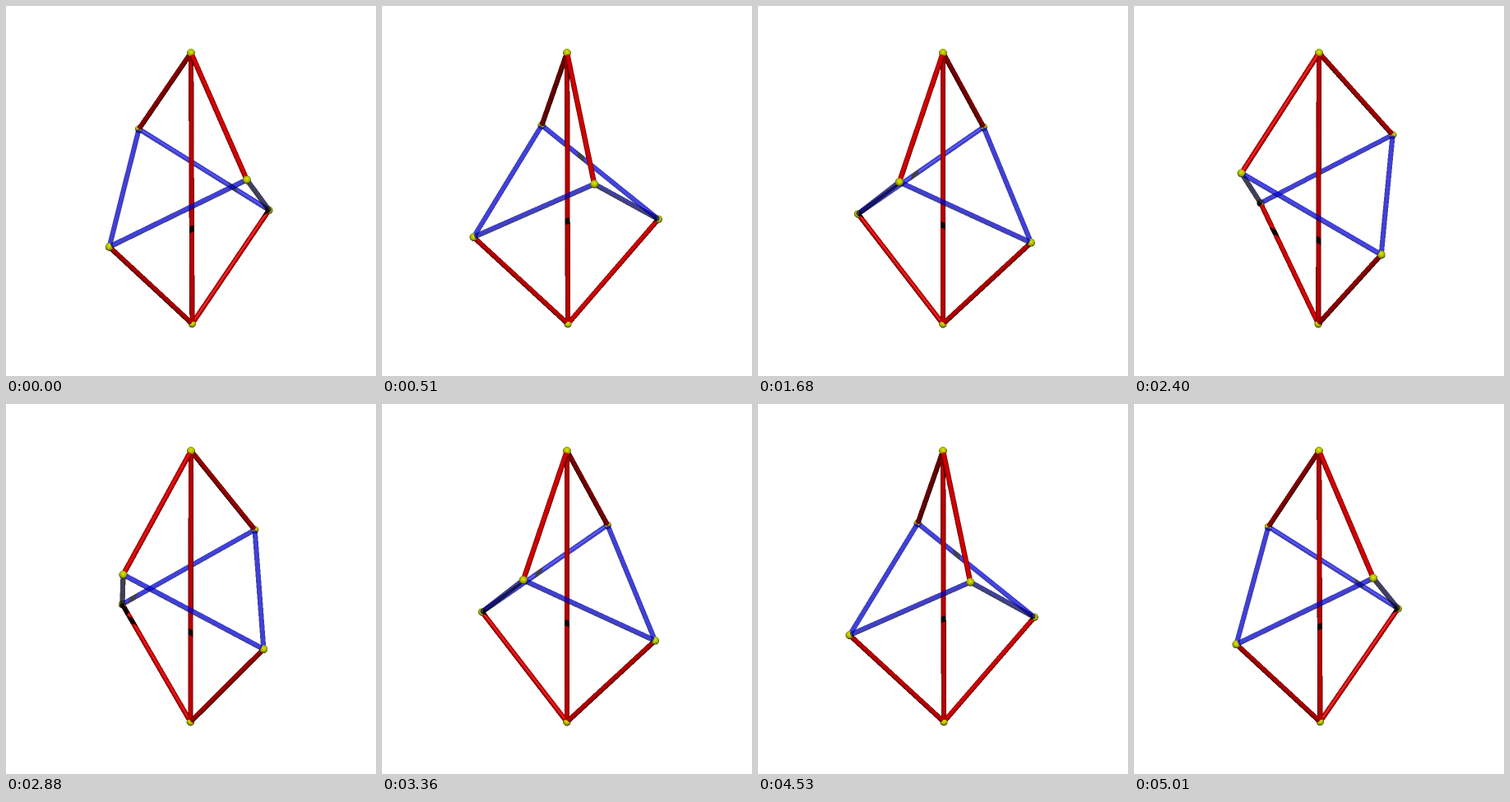
Recreate the animation shown at these times as an HTML page with a canvas. Size 450 px wide and 450 px high, loop 5.04 s.

```html
<!DOCTYPE html>
<html lang="en">
<head>
<meta charset="utf-8">
<title>Swinging bar framework</title>
<style>
  html, body { margin: 0; width: 100%; height: 100%; overflow: hidden; background: #fff; }
  canvas { display: block; width: 450px; height: 450px; }
</style>
</head>
<body>
<canvas id="stage" width="450" height="450"></canvas>
<script>
const SIZE = 450, MID = 225;
const STEP_MS = 30, STEPS = 168;
const RAD = Math.PI / 180;

// Camera looks down by TILT from distance DIST; the light sits above it.
const TILT = 19.24 * RAD, DIST = 2700;
const LIGHT = [0, -Math.sin(15.8 * RAD), Math.cos(15.8 * RAD)];
const HALF = [0, -Math.sin(7.9 * RAD), Math.cos(7.9 * RAD)];
const AMBIENT = 0.1;

const ARM = 117.4, ARM_Z = 48, POLE_Z = 174.2;
const ROD_R = 3.1, BALL_R = 4.8;
const RED = { rgb: [212, 0, 0], alpha: 1, gloss: 110 };
const BLUE = { rgb: [0, 0, 222], alpha: 0.75, gloss: 110 };
const YELLOW = { rgb: [205, 215, 0], alpha: 1, gloss: 40 };

// Body coordinates: side, front, height.
const NODES = [
  [0, 0, POLE_Z], [0.65, 1.6, -POLE_Z],
  [0, ARM, ARM_Z], [0, -ARM, ARM_Z],
  [ARM, 0, -ARM_Z], [-ARM, 0, -ARM_Z]
];
const BARS = [
  [0, 1, RED], [0, 2, RED], [0, 3, RED], [1, 4, RED], [1, 5, RED],
  [2, 4, BLUE], [2, 5, BLUE], [3, 4, BLUE], [3, 5, BLUE]
];

const ctx = document.getElementById('stage').getContext('2d');
const image = ctx.createImageData(SIZE, SIZE);
const dot = (a, b) => a[0] * b[0] + a[1] * b[1] + a[2] * b[2];

// Screen x, screen y, depth towards the viewer, scale.
function project([side, front, height], angle) {
  const c = Math.cos(angle), s = Math.sin(angle);
  const x = side * c + front * s;
  const f = front * c - side * s;
  const depth = f * Math.cos(TILT) + height * Math.sin(TILT);
  const up = height * Math.cos(TILT) - f * Math.sin(TILT);
  const k = 1 / (1 - depth / DIST);
  return [MID + x * k, MID - up * k, depth, k];
}

function makeRod(a, b, paint) {
  const d = [b[0] - a[0], b[1] - a[1], b[2] - a[2]];
  const len = Math.hypot(...d);
  const u = d.map(v => v / len);
  const m = Math.hypot(u[0], u[1]);
  const r = ROD_R * (a[3] + b[3]) / 2;
  const side = [u[1] / m, -u[0] / m];
  const face = [-u[2] * u[0] / m, -u[2] * u[1] / m, m];
  const lu = dot(LIGHT, u);
  const rod = { paint };

  rod.near = (x, y) => {
    const dx = x - a[0], dy = y - a[1];
    if (Math.abs(dx * side[0] + dy * side[1]) > r + 1) return false;
    const along = (dx * u[0] + dy * u[1]) / m;
    return along > -r - 1 && along < len * m + r + 1;
  };

  rod.hit = (x, y) => {
    const dx = x - a[0], dy = y - a[1];
    const e = dx * side[0] + dy * side[1];
    if (Math.abs(e) >= r) return null;
    const h = Math.sqrt(r * r - e * e);
    const t = ((dx * u[0] + dy * u[1]) / m + h * u[2]) / m;
    if (t < 0 || t > len) return null;
    const normal = [
      (e * side[0] + h * face[0]) / r,
      (e * side[1] + h * face[1]) / r,
      h * face[2] / r
    ];
    return { part: rod, point: [x, y, a[2] + t * u[2] + h * m], normal };
  };

  // Does this rod lie between the point and the light?
  rod.blocks = p => {
    const q = [p[0] - a[0], p[1] - a[1], p[2] - a[2]];
    const qu = dot(q, u), ql = dot(q, LIGHT);
    const s = (lu * qu - ql) / (1 - lu * lu);
    const t = qu + s * lu;
    if (s <= 0 || t < 0 || t > len) return false;
    return dot(q, q) + s * s + t * t + 2 * (s * ql - t * qu - s * t * lu) < r * r;
  };
  return rod;
}

function makeBall(c) {
  const r = BALL_R * c[3];
  const ball = { paint: YELLOW };
  ball.near = (x, y) => Math.hypot(x - c[0], y - c[1]) < r + 1;
  ball.hit = (x, y) => {
    const dx = x - c[0], dy = y - c[1];
    const hh = r * r - dx * dx - dy * dy;
    if (hh <= 0) return null;
    const h = Math.sqrt(hh);
    return { part: ball, point: [x, y, c[2] + h], normal: [dx / r, dy / r, h / r] };
  };
  return ball;
}

function shade({ part, point, normal }, rods) {
  const { rgb, gloss } = part.paint;
  const facing = dot(normal, LIGHT);
  const dark = facing <= 0 || rods.some(rod => rod !== part && rod.blocks(point));
  if (dark) return rgb.map(v => v * AMBIENT);
  const level = Math.max(AMBIENT, Math.pow(facing, 0.6));
  const shine = gloss * Math.pow(Math.max(0, dot(normal, HALF)), 150);
  return rgb.map(v => Math.min(255, v * level + shine));
}

function addSample(x, y, parts, rods, sum) {
  const hits = [];
  for (const part of parts) {
    const hit = part.hit(x, y);
    if (hit) hits.push(hit);
  }
  hits.sort((p, q) => q.point[2] - p.point[2]);
  let left = 1;
  for (const hit of hits) {
    const color = shade(hit, rods);
    const alpha = hit.part.paint.alpha;
    for (let i = 0; i < 3; i++) sum[i] += color[i] * alpha * left;
    left *= 1 - alpha;
    if (left === 0) break;
  }
  for (let i = 0; i < 3; i++) sum[i] += 255 * left;
}

function draw(step) {
  const turn = Math.min(step, STEPS - step);
  const angle = (33.7 - 1.06 * turn) * RAD;
  const pts = NODES.map(n => project(n, angle));
  const rods = BARS.map(([i, j, paint]) => makeRod(pts[i], pts[j], paint));
  const parts = rods.concat(pts.map(makeBall));
  image.data.fill(255);
  for (let y = 50; y < 394; y++) {
    for (let x = 100; x < 350; x++) {
      const close = parts.filter(p => p.near(x + 0.5, y + 0.5));
      if (!close.length) continue;
      const sum = [0, 0, 0];
      for (const oy of [0.25, 0.75]) {
        for (const ox of [0.25, 0.75]) addSample(x + ox, y + oy, close, rods, sum);
      }
      const at = (y * SIZE + x) * 4;
      for (let i = 0; i < 3; i++) image.data[at + i] = sum[i] / 4;
    }
  }
  ctx.putImageData(image, 0, 0);
}

const start = performance.now();
let shown = -1;
function tick() {
  const step = Math.floor((performance.now() - start) / STEP_MS) % STEPS;
  if (step !== shown) draw(shown = step);
  requestAnimationFrame(tick);
}
tick();
</script>
</body>
</html>
```
